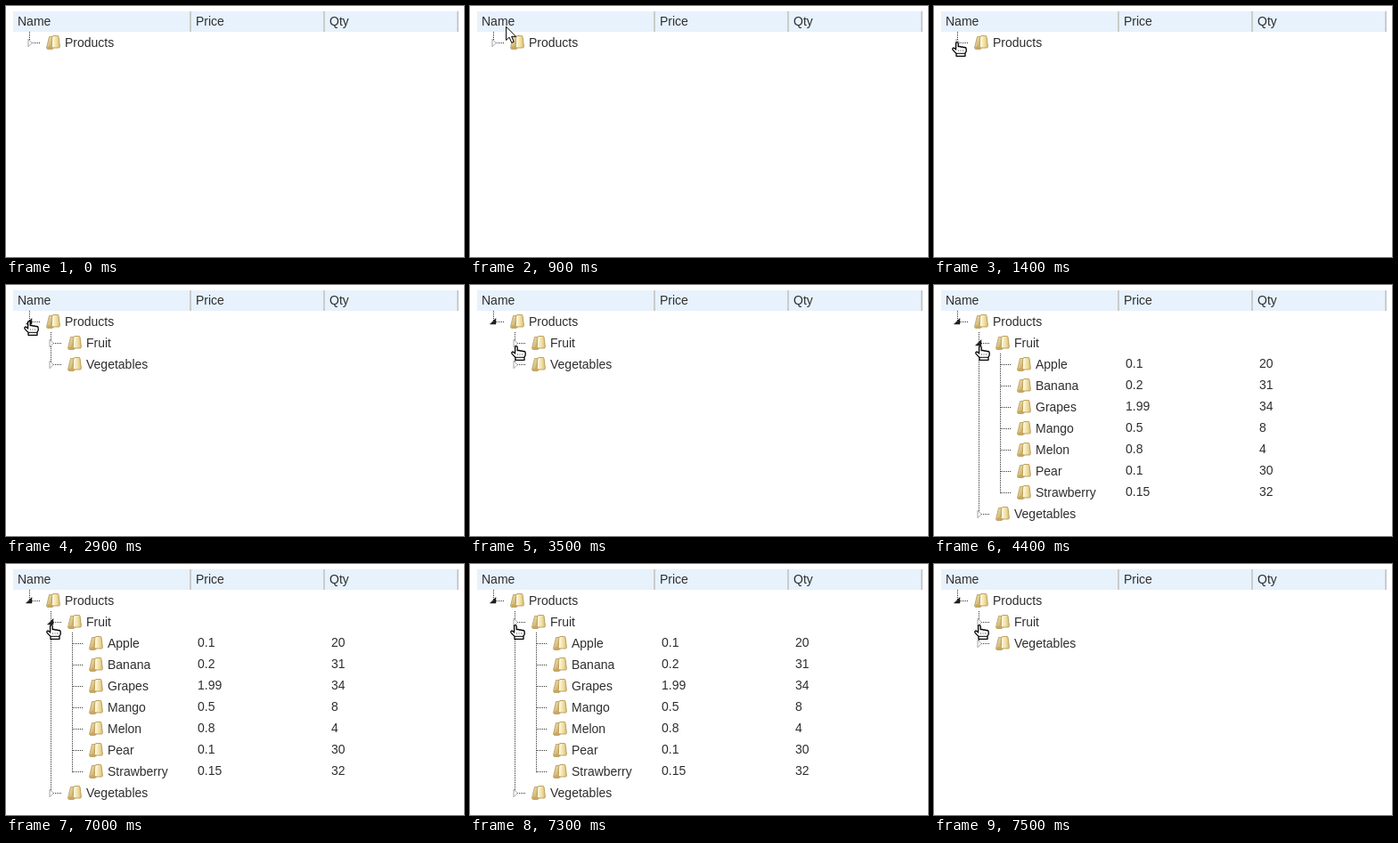
An HTML page that plays this animation: 514x282 px, repeating every 8000 ms.

```html
<!DOCTYPE html>
<html lang="en">
<head>
<meta charset="utf-8">
<title>Tree grid</title>
<style>
html, body { margin: 0; width: 100%; height: 100%; overflow: hidden; background: #fff; }
svg { display: block; width: 514px; height: 282px; }
text { font: 14px "Liberation Sans", Arial, sans-serif; fill: #2e2e2e; }
.dots { fill: none; stroke: #333; stroke-dasharray: 1 1; shape-rendering: crispEdges; }
</style>
</head>
<body>
<svg id="stage" viewBox="0 0 514 282">
  <defs>
    <linearGradient id="front" x2="1">
      <stop offset="0" stop-color="#fffadd"/>
      <stop offset=".55" stop-color="#f2e2a6"/>
      <stop offset="1" stop-color="#d9bd72"/>
    </linearGradient>
    <linearGradient id="back" x2="1" y2="1">
      <stop offset="0" stop-color="#f5e8b8"/>
      <stop offset="1" stop-color="#bd9a4d"/>
    </linearGradient>
    <g id="folder">
      <path d="M3.5 1.5H7.5L8.5 3V14L7 15.5H1.5L.5 14Z" fill="url(#back)" stroke="#b39a62" stroke-width=".8"/>
      <path d="M1 13.5L4 12L7.5 15.2H1.5Z" fill="#c9a85c"/>
      <path d="M7 1.2L8 .5H13.2L14 1.2L15.4 12.5L14.8 14H7.2L6.3 12.8Z" fill="url(#front)" stroke="#b08f4b" stroke-width=".8"/>
      <path d="M8 2L7.4 12.5" fill="none" stroke="#fffdf0"/>
    </g>
    <path id="closed" d="M-1.5 -4.2L2.7 0L-1.5 4.2Z" fill="#fff" stroke="#999" stroke-width=".9"/>
    <path id="open" d="M2.5 -4V2.5H-4Z" fill="#222" stroke="#111" stroke-width=".5"/>
    <g id="hand">
      <path d="M4.6 9V2Q4.6 .7 5.9 .7Q7.2 .7 7.2 2V5.6L9 5.3L10 6L12 5.8L13 6.5L14.8 6.5Q16.2 6.8 16.2 8.4V11L15 13V16.3H5V13.4L1.2 9.4Q.2 7.6 1.8 7Q3.4 7.2 4.6 9Z" fill="#fff" stroke="#000" stroke-width="1.3" stroke-linejoin="round"/>
      <path d="M5 13.3H15" stroke="#000"/>
      <path d="M7.5 9V11M10 9V11M12.5 9V11" stroke="#777" stroke-width=".7"/>
    </g>
    <path id="arrow" d="M.6 1.2V16.5L4.1 13.2L6.8 19.3L9.2 18.2L6.6 12.3H11.6Z" fill="#fff" stroke="#000" stroke-linejoin="round"/>
  </defs>
</svg>
<script>
const NS = "http://www.w3.org/2000/svg";
const stage = document.getElementById("stage");

function add(parent, tag, attrs = {}, label) {
  const el = document.createElementNS(NS, tag);
  for (const k in attrs) el.setAttribute(k, attrs[k]);
  if (label !== undefined) el.textContent = label;
  parent.append(el);
  return el;
}
const group = () => add(stage, "g");
const text = (p, x, y, s) => add(p, "text", { x, y }, s);
const use = (p, id, x = 0, y = 0) => add(p, "use", { href: "#" + id, x, y });
const dots = (p, d) => add(p, "path", { d, class: "dots" });

// Branch, icon and label of one tree row centred on y
function node(p, level, y, label) {
  const x = 26 + level * 24;
  dots(p, `M${x + (level < 2 ? 3 : 1)} ${y + .5}H${x + 13}`);
  use(p, "folder", x + 19, y - 8);
  text(p, x + 40, y + 5, label);
}
function expander(level, y, id, parent = stage) {
  return use(parent, id, 26.5 + level * 24, y + .5);
}

// Header
add(stage, "rect", { x: 8, y: 6, width: 500, height: 23, fill: "#e7f2fc" });
for (const x of [206, 356, 506])
  add(stage, "rect", { x, y: 6, width: 2, height: 23, fill: "#ccc" });
text(stage, 13, 22, "Name");
text(stage, 213, 22, "Price");
text(stage, 363, 22, "Qty");

// Root
dots(stage, "M26.5 29V42");
node(stage, 0, 41, "Products");
const rootClosed = expander(0, 41, "closed");
const rootOpen = expander(0, 41, "open");

// Categories
const kids = group();
const trunk = dots(kids, "M50.5 53V90");
node(kids, 1, 65, "Fruit");
const fruitClosed = expander(1, 65, "closed", kids);
const fruitOpen = expander(1, 65, "open", kids);
const last = add(kids, "g");
node(last, 1, 89, "Vegetables");
expander(1, 89, "closed", last);

// Items
const items = [
  ["Apple", "0.1", "20"], ["Banana", "0.2", "31"], ["Grapes", "1.99", "34"],
  ["Mango", "0.5", "8"], ["Melon", "0.8", "4"], ["Pear", "0.1", "30"],
  ["Strawberry", "0.15", "32"]
];
const leaves = group(), values = group();
dots(leaves, "M74.5 77V234");
items.forEach(([name, price, qty], i) => {
  const y = 89 + i * 24;
  node(leaves, 2, y, name);
  text(values, 215, y + 4, price);
  text(values, 365, y + 4, qty);
});

const pointer = group();
const shapes = { arrow: use(pointer, "arrow"), hand: use(pointer, "hand") };

// time, shape, x, y
const moves = [
  [600, "arrow", 58, 1], [800, "arrow", 51, 8], [900, "arrow", 40, 22],
  [1000, "arrow", 29, 33], [1100, "hand", 20, 37], [1300, "hand", 20, 38],
  [1400, "hand", 20, 40], [3000, "arrow", 33, 47], [3100, "arrow", 43, 55],
  [3200, "hand", 45, 61], [3400, "hand", 46, 65], [3500, "hand", 46, 68],
  [7000, "hand", 45, 68]
];

const show = (el, on) => el.setAttribute("visibility", on ? "visible" : "hidden");

function render(t) {
  const within = (a, b = 8000) => t >= a && t < b;
  const grown = within(4400, 7500), fruit = within(4200, 7300);
  const expanded = within(2100);
  show(rootOpen, within(2000));
  show(rootClosed, !within(2000));
  show(kids, expanded);
  show(fruitOpen, expanded && fruit);
  show(fruitClosed, expanded && !fruit);
  show(values, within(4200, 7400));
  show(leaves, grown);
  last.setAttribute("transform", `translate(0 ${grown ? items.length * 24 : 0})`);
  trunk.setAttribute("d", `M50.5 53V${grown ? 258 : 90}`);

  const at = moves.filter(m => m[0] <= t).pop();
  for (const k in shapes) show(shapes[k], at && at[1] === k);
  if (at) pointer.setAttribute("transform", `translate(${at[2]} ${at[3]})`);
}

const start = performance.now();
function tick() {
  render((performance.now() - start) % 8000);
  requestAnimationFrame(tick);
}
tick();
</script>
</body>
</html>
```
